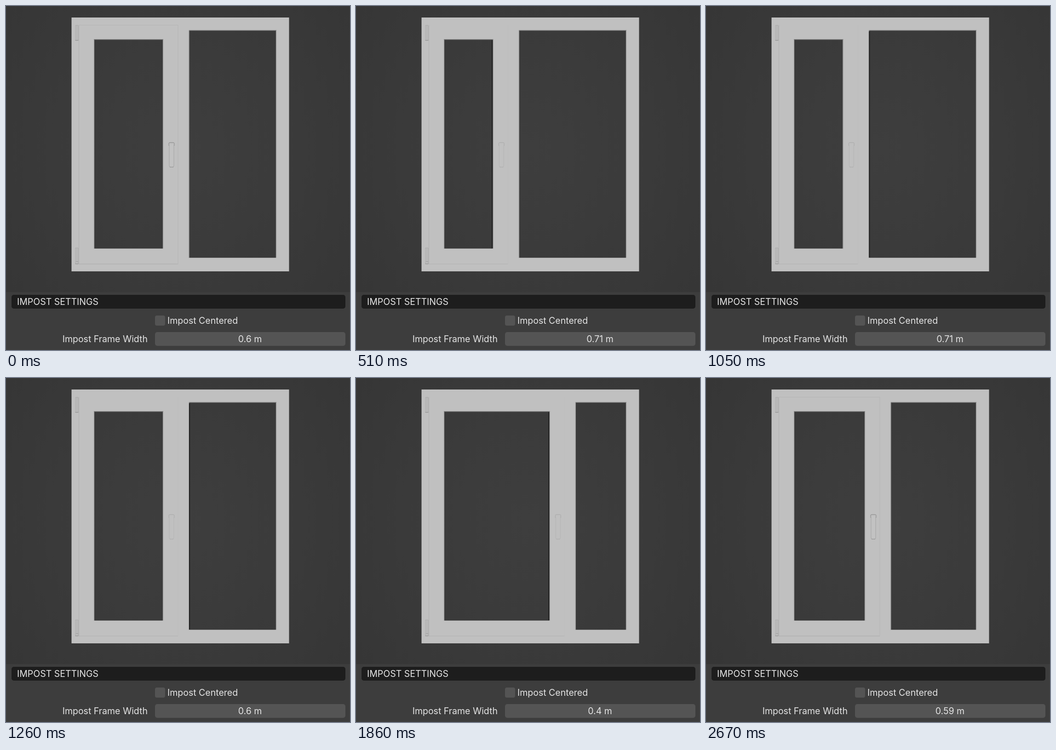
Animation of 748 by 748 pixels, one loop 2700 ms. Source, as an HTML page:

```html
<!DOCTYPE html>
<html lang="en">
<head>
<meta charset="utf-8">
<title>Impost settings</title>
<style>
html, body { margin: 0; width: 100%; height: 100%; overflow: hidden; background: #3d3d3d; }
svg { display: block; width: 100vw; height: 100vh; }
text { font: 19.5px Inter, sans-serif; fill: #e5e5e5; }
</style>
</head>
<body>
<svg viewBox="0 0 748 748">
  <defs>
    <radialGradient id="bg" gradientUnits="userSpaceOnUse" cx="374" cy="310" r="480">
      <stop offset="0" stop-color="#3e3e3e"/>
      <stop offset=".45" stop-color="#3b3b3b"/>
      <stop offset="1" stop-color="#363636"/>
    </radialGradient>
  </defs>
  <rect width="748" height="622" fill="url(#bg)"/>

  <path id="body" fill="#c0c0c0" fill-rule="evenodd"/>
  <g fill="none">
    <path id="sides" stroke="#a6a6a6" stroke-width="1.6"/>
    <path id="tops" stroke="#858585" stroke-width="1.6"/>
    <path id="sills" stroke="#cacaca"/>
    <path id="ghost" stroke="#1c1c1c" stroke-width="2"/>
    <path d="M158.5 42V561" stroke="#b1b1b1"/>
    <path id="rail" stroke="#acacac" stroke-width="1.2"/>
    <path id="stile" stroke="#b5b5b5"/>
    <path d="M151 42h6v33h-6zM151 526h6v35h-6zM154 42v32M154 527v28" stroke="#a8a8a8"/>
    <path d="M150.5 74.5h7M150.5 560.5h7M152 556h5" stroke="#929292"/>
    <g id="handle">
      <path d="M-6 304v-4q0-3 3-3h6q3 0 3 3v4" stroke="#979797" stroke-width="1.3"/>
      <path d="M-5 301v46q0 3 3 3h4q3 0 3-3v-46" fill="#c2c2c2" stroke="#a9a9a9" stroke-width="1.2"/>
      <path d="M-4 350.5h8" stroke="#969696"/>
    </g>
  </g>

  <rect x="12" y="628" width="726" height="30" rx="5" fill="#1d1d1d"/>
  <g fill="#545454">
    <rect x="324" y="673" width="22" height="22" rx="4"/>
    <rect x="324" y="709" width="414" height="30" rx="5"/>
  </g>
  <text x="24" y="649.5">IMPOST SETTINGS</text>
  <text x="351" y="690.5">Impost Centered</text>
  <text x="308" y="730.5" text-anchor="end">Impost Frame Width</text>
  <text id="value" x="530.5" y="730.5" text-anchor="middle">0.6 m</text>
</svg>
<script>
const LOOP = 2700, TICK = 30;
// Drag positions: [ms, metres]
const KEYS = [
  [0, .6], [30, .6], [60, .61], [510, .706], [780, .78], [930, .78],
  [1260, .6], [1470, .46], [1590, .4], [1700, .38], [1860, .396],
  [2220, .52], [2280, .52], [2520, .57], [2580, .57], [2610, .58],
  [2640, .59], [LOOP, .59]
];
const $ = id => document.getElementById(id);
const setPath = (id, d) => $(id).setAttribute('d', d);
const box = (l, t, r, b) => `M${l} ${t}H${r}V${b}H${l}Z`;

function widthAt(t) {
  const i = Math.max(1, KEYS.findIndex(k => k[0] >= t));
  const [t0, a] = KEYS[i - 1], [t1, b] = KEYS[i];
  return Math.round((a + (b - a) * (t - t0) / (t1 - t0)) * 100) / 100;
}

function draw(t) {
  const w = widthAt(t);
  const step = Math.sign(w - widthAt(Math.max(0, t - TICK)));
  const x = 398 - 397 * (w - .6);   // left edge of the fixed pane
  const r = x - 56;                 // right edge of the sash pane
  const edge = x - 24;

  setPath('body', box(142.5, 25, 615.5, 577) + box(191, 72.5, r, 528) + box(x, 53, 588, 548));
  setPath('sides', `M191.3 73V528M${r - .3} 73V528M${x - .3} 53V548M587.7 53V548`);
  setPath('tops', `M191 72.8H${r}M${x} 53H588`);
  setPath('sills', `M191 528H${r}M${x} 548H588`);
  setPath('rail', `M158 561H${edge}`);
  setPath('stile', `M${edge} 41V561M158 41.5H${edge}`);
  setPath('ghost', step > 0 || (step && t > 1700) ? `M${r - 2} 74V527` : step ? `M${x + 1} 55V547` : 'M0 0');

  // Fine shading settles only while the value rests
  $('stile').setAttribute('opacity', step ? .15 : 1);
  $('rail').setAttribute('opacity', step ? .7 : 1);
  $('handle').setAttribute('opacity', step ? .4 : 1);
  $('handle').setAttribute('transform', `translate(${x - 38} 0)`);
  $('value').textContent = w + ' m';
}

let start, last;
function loop(now) {
  start ??= now;
  const t = Math.floor((now - start) % LOOP / TICK) * TICK;
  if (t !== last) draw(last = t);
  requestAnimationFrame(loop);
}
draw(0);
requestAnimationFrame(loop);
</script>
</body>
</html>
```
